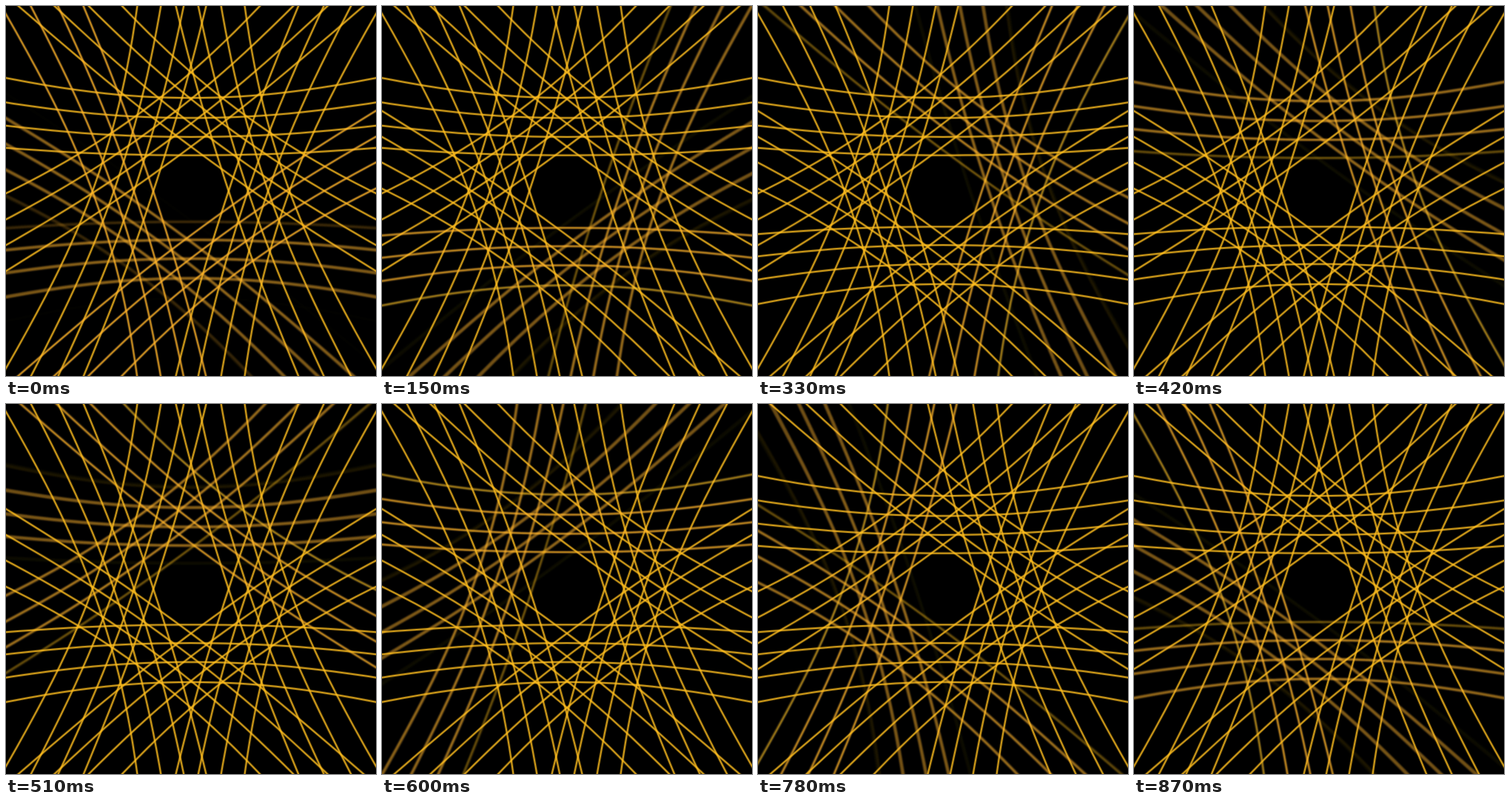
An HTML page with a canvas for the animation above (0.9 s loop, 500 px wide and 500 px high).

```html
<!DOCTYPE html>
<html>
<head>
<meta charset="utf-8">
<style>
html, body { margin: 0; width: 100%; height: 100%; overflow: hidden; background: #000; }
canvas { display: block; width: 100vw; height: 100vh; }
</style>
</head>
<body>
<canvas id="stage" width="500" height="500"></canvas>
<script>
const SIZE = 500, HALF = SIZE / 2;
const LOOP = 900, STEP = 30, MOVE = 300;
const SIDES = 10, GAP = 24, FIRST = 2, LAST = 6;
const REACH = 330, SEG = 15, BLUR = 10;
const COLOR = '255,190,30';

const view = document.getElementById('stage').getContext('2d');
const layer = document.createElement('canvas');
layer.width = layer.height = SIZE;
const pen = layer.getContext('2d');
pen.globalCompositeOperation = 'lighter';

// Progress of one side's inward step, 0 to 1
function progress(t, side) {
  const mid = 240 + side * LOOP / SIDES;
  const local = ((t - mid + LOOP / 2) % LOOP + LOOP) % LOOP - LOOP / 2;
  const u = Math.min(1, Math.max(0, local / MOVE + 0.5));
  return u * u * (3 - 2 * u);
}

// A straight line at distance d, bent by a pincushion lens
function trace(d, cos, sin) {
  pen.beginPath();
  for (let s = -REACH; s <= REACH; s += SEG) {
    const q = d * d + s * s;
    const f = 1 + 2.7e-6 * q + 4.6e-11 * q * q;
    pen.lineTo(HALF + f * (d * cos + s * sin), HALF + f * (d * sin - s * cos));
  }
}

function stroke(width, alpha) {
  pen.lineWidth = width;
  pen.strokeStyle = `rgba(${COLOR},${alpha})`;
  pen.stroke();
}

function drawSide(side, p, weight) {
  const a = (18 - side * 360 / SIDES) * Math.PI / 180;
  const cos = Math.cos(a), sin = Math.sin(a);
  for (let n = FIRST; n <= LAST; n++) {
    const fade = n === FIRST ? (1 - p) ** 3 : n === LAST ? p ** 3 : 1;
    if (fade < 0.001) continue;
    trace((n - p) * GAP, cos, sin);
    stroke(3.8, 0.24 * fade * weight);
    stroke(2, 0.56 * fade * weight);
  }
}

function draw(t) {
  view.fillStyle = '#000';
  view.fillRect(0, 0, SIZE, SIZE);
  for (let side = 0; side < SIDES; side++) {
    const still = progress(t, side) === progress(t + STEP, side);
    const count = still ? 1 : BLUR;
    pen.clearRect(0, 0, SIZE, SIZE);
    for (let i = 0; i < count; i++) {
      drawSide(side, progress(t + STEP * (i + 0.5) / count, side), 1 / count);
    }
    view.drawImage(layer, 0, 0);
  }
}

const start = performance.now();
let shown = -1;

function tick() {
  const t = Math.floor((performance.now() - start) % LOOP / STEP) * STEP;
  if (t !== shown) draw(shown = t);
  requestAnimationFrame(tick);
}
tick();
</script>
</body>
</html>
```
